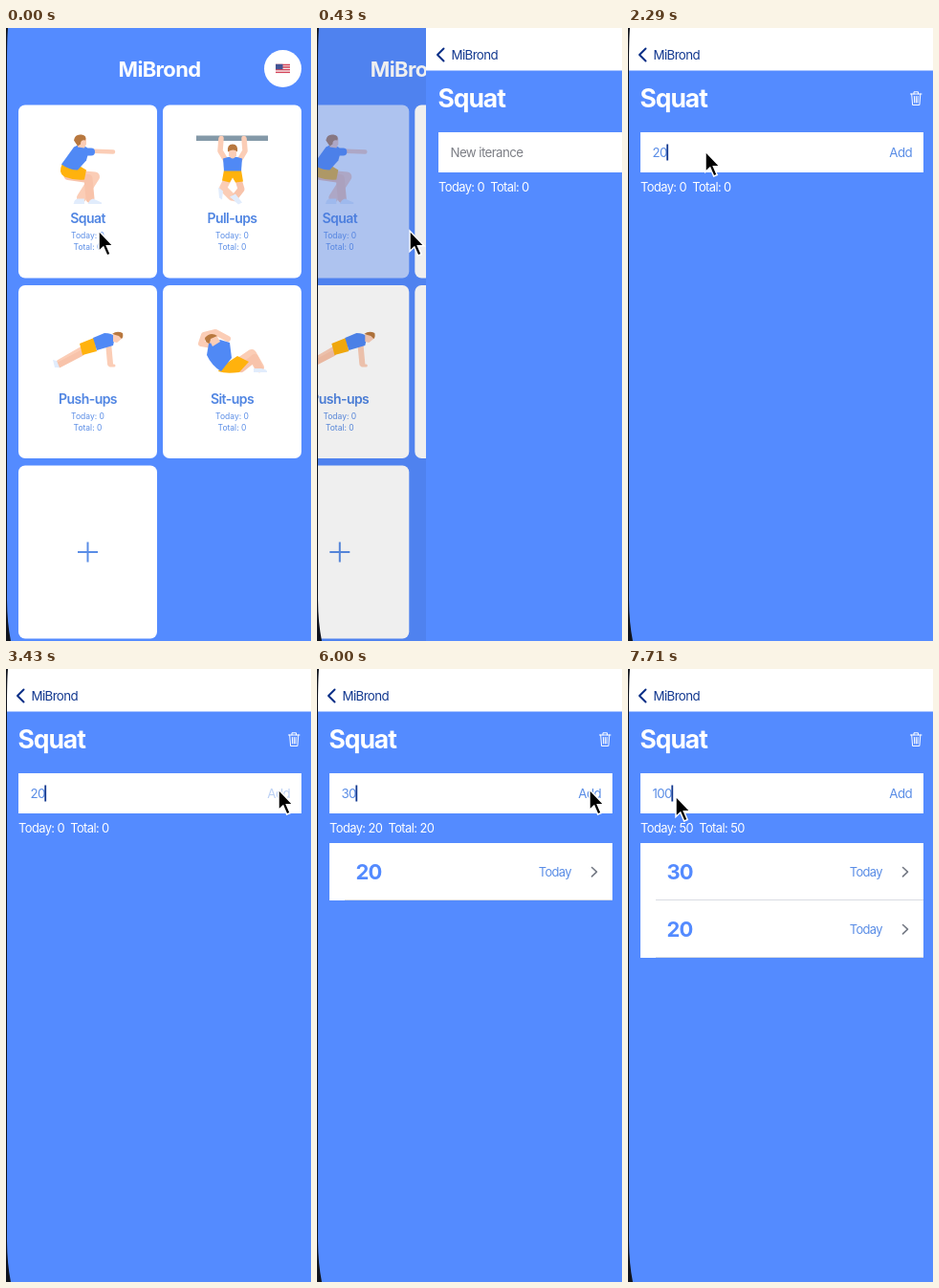
Write an HTML page that moves like this. It is 319x641 px and loops after 8 s.

```html
<!DOCTYPE html>
<html lang="en">
<head>
<meta charset="utf-8">
<title>Workout tracker</title>
<style>
html, body { margin: 0; width: 100%; height: 100%; overflow: hidden; background: #548bff; }
svg { display: block; width: 100%; height: 100%; }
text { font: 13.3px Inter, "Open Sans", sans-serif; letter-spacing: -.045em; white-space: pre; fill: #5a8de6; }
.mid { text-anchor: middle; }
.name { font-size: 14px; font-weight: 600; letter-spacing: -.04em; fill: #5085e2; }
.small { font-size: 8.5px; letter-spacing: 0; }
.logo { font-size: 22px; font-weight: 700; letter-spacing: -.03em; fill: #fff; }
.title { font-size: 26.5px; font-weight: 700; letter-spacing: -.04em; fill: #fff; }
.sum { font-size: 12.9px; fill: #fff; }
.count { font-size: 22px; font-weight: 700; letter-spacing: -.04em; fill: #548bff; }
.day { font-size: 12.9px; text-anchor: end; }
.line { fill: none; stroke-linecap: round; stroke-linejoin: round; }
</style>
</head>
<body>
<svg viewBox="0 0 319 641">
  <rect width="319" height="641" fill="#548bff"/>
  <g id="home">
    <text class="logo mid" x="160.5" y="50.5">MiBrond</text>
    <circle cx="289.5" cy="42.5" r="19.5" fill="#fff"/>
    <path d="M282 38h15v9.5h-15z" fill="#f3e4e6"/>
    <path d="M282 38.5h15M282 41h15M282 43.6h15M282 46.4h15" stroke="#d5455a" stroke-width="1.3"/>
    <path d="M282 37.8h7.5v5.4h-7.5z" fill="#435493"/>
    <g id="cards"></g>
    <path d="M85.5 537.5v21M75 548h21" stroke="#5a8de6" stroke-width="2"/>
  </g>
  <rect id="dim" width="319" height="641"/>
  <g id="page">
    <rect width="320" height="641" fill="#548bff"/>
    <rect width="320" height="44.5" fill="#fff"/>
    <path class="line" d="M18.5 21.5 12 28l6.5 6.5" stroke="#0b2f86" stroke-width="2"/>
    <text x="26.5" y="32.5" style="fill:#12388f">MiBrond</text>
    <text class="title" x="12.5" y="82.5">Squat</text>
    <path class="line" d="M295.5 69h11.5M299 69v-2.2h4.5v2.2M296.7 69l.9 11.5h7.3l.9-11.5M299.4 71.5l.3 6.5M301.3 71.5v6.5M303.2 71.5l-.3 6.5" stroke="#fff"/>
    <rect x="13" y="109" width="296" height="42" fill="#fff"/>
    <text id="field" x="25.5" y="135"></text>
    <rect id="caret" y="121.5" width="1.8" height="17" fill="#12388f"/>
    <text id="add" x="297" y="135" text-anchor="end">Add</text>
    <text id="sum" class="sum" x="13" y="171"></text>
    <g id="rows"></g>
  </g>
  <path d="M0 0H2Q1 12 1 40V598Q1.2 622 5 641H0z" fill="#10131c"/>
  <path id="mouse" d="M0 0V21.5L4.8 17 8.7 26 12.2 24.5 8.4 15.7H15z" stroke="#fff" stroke-width="1.5"/>
</svg>
<script>
const $ = id => document.getElementById(id);
const SKIN = '#fbcdb6', HAIR = '#b8783f', BLUE = '#5089f5', GOLD = '#ffb20d', SHOE = '#e1ecfc', BAR = '#8499a8';
const fill = (color, d) => `<path d="${d}" fill="${color}"/>`;
const limb = (width, d, color = SKIN) => `<path class="line" d="${d}" stroke="${color}" stroke-width="${width}"/>`;

// Figures are drawn relative to their card's corner.
const squat =
  limb(10, 'M58 73 80 75 66 97') + limb(9, 'M52 74 73 77 75 98', '#f8c3aa') +
  fill(SHOE, 'M58 103q0-4 4-5h7v5.500H57zM73 103q1-4 5-5l9 4v1.500H72z') +
  fill(GOLD, 'M46 61q-5 10 2 14 10 4 21 3l2-10-10-6z') +
  fill(BLUE, 'M45 62 58 44q6-4 13 0l3 3-3 11-9 10q-9 0-17-6z') +
  limb(4.5, 'M72 48 99 49') + limb(8, 'M66 49 76 49', BLUE) +
  fill(SKIN, 'M62 35h9v6l-2 4-7-1z') + fill(HAIR, 'M58 37q1-7 8-6 6 1 4 6-5-1-5 4l-3 2z');
const pullUps =
  fill(BAR, 'M35 32h75v5.500H35z') +
  limb(5.5, 'M61 35 60 48 66 58M85 35 86 48 80 58') +
  limb(8, 'M68 77 63 87 72 96') + limb(7, 'M79 78 82 88 75 97', '#f8c3aa') +
  fill(SHOE, 'M70 96l6-3 7 9-4 2zM58 86l5 4-1 9-3-2z') +
  fill(GOLD, 'M64 68h18l2 12-8 1-3-5-3 5-8-2z') +
  fill(BLUE, 'M63 56q10-4 20 0l-1 13H64z') +
  fill(SKIN, 'M69 46h8v7q-4 6-8 0z') + fill(HAIR, 'M68 49q-1-8 5-8t5 8q-4-4-10 0z');
const pushUps =
  limb(7, 'M43 81 69 66') + limb(6, 'M43 83 66 71', '#f8c3aa') +
  fill(SHOE, 'M36 78l4 1 3 7-5 0z') +
  limb(6, 'M94 60 96 82') + limb(3, 'M96 84h4') +
  fill(GOLD, 'M64 61 79 55 82 69 67 73z') +
  fill(BLUE, 'M78 55 90 50q8 0 11 4l-2 9-17 5z') +
  fill(SKIN, 'M99 52l8-3 1 7-5 4-4-1z') + fill(HAIR, 'M98 51q5-4 11-1 1 4-1 6l-3-3z');
const sitUps =
  limb(6, 'M52 63 40 61 43 52 55 49 68 56') +
  limb(10, 'M74 85 93 72 101 86') + limb(8, 'M82 87 96 76 101 87', '#f8c3aa') +
  fill(SHOE, 'M95 87h8q7 1 6 4H95z') +
  fill(GOLD, 'M60 86 78 74l12 6-10 11q-14 2-22-1z') +
  fill(BLUE, 'M48 61 60 57l10 3 2 16-11 14q-10-6-15-17z') +
  fill(SKIN, 'M47 54l9-2 4 7-8 5z') + fill(HAIR, 'M44 55q6-7 13-2l-7 3-1 5q-5-1-5-6z');

const card = (x, y, name, art) => `<g transform="translate(${x} ${y})">
  <rect width="145" height="181" rx="7" fill="#fff"/>${art || ''}` + (name ? `
  <text class="name mid" x="72.500" y="123.500">${name}</text>
  <text class="small mid" x="72.500" y="139.500">Today: 0</text>
  <text class="small mid" x="72.500" y="151.500">Total: 0</text>` : '') + '</g>';
$('cards').innerHTML = card(13, 80.5, 'Squat', squat) + card(164, 80.5, 'Pull-ups', pullUps) +
  card(13, 269, 'Push-ups', pushUps) + card(164, 269, 'Sit-ups', sitUps) + card(13, 457.5);

const row = (count, i) => `<g transform="translate(0 ${182 + i * 60})">
  <path d="M13 0h296v60H13z" fill="#fff"/><path d="M29 59.500h280" stroke="#d9dce3"/>
  <text class="count" x="40.500" y="38">${count}</text>
  <text class="day" x="266" y="35">Today</text>
  <path class="line" d="M287.500 25.500l5 4.700-5 4.700" stroke="#757a85" stroke-width="1.600"/></g>`;

const LOOP = 8000, RATE = 7;
const path = [[0, 97, 212], [4, 97, 212], [6, 97, 163], [8, 81, 129], [19, 81, 129], [23, 285, 126],
  [25, 285, 126], [27, 82, 127], [28, 70, 124], [37, 70, 124], [41, 281, 126], [42, 285, 126],
  [43, 285, 126], [45, 51, 135], [46, 50, 133], [56, 50, 133]];
const typed = [[0, ''], [15, '2'], [16, '20'], [25, ''], [33, '3'], [34, '30'], [44, ''], [50, '1'], [52, '10'], [54, '100']];
const caretOn = [[0, 0], [9, 1], [14, 0], [15, 1], [25, 0], [30, 1], [44, 0], [48, 1]];
const entries = [[0, []], [25, [20]], [44, [30, 20]]];
const slide = [319, 319, 258, 114, 34, 8, 0];
const fade = [1, .6, .4, .6, .8, .95, 1];

const at = (keys, n) => keys.findLast(k => k[0] <= n)[1];
function pointer(n) {
  const i = path.findIndex(k => k[0] > n), [a, x, y] = path[i - 1], [b, u, v] = path[i];
  const p = (n - a) / (b - a);
  return [x + (u - x) * p, y + (v - y) * p];
}

let shown = -1;
function draw(n) {
  const x = slide[Math.min(n, 6)], p = 1 - x / 319;
  $('home').setAttribute('transform', `translate(${-96 * p} 0)`);
  $('cards').firstElementChild.setAttribute('opacity', fade[Math.min(n, 6)]);
  $('dim').setAttribute('opacity', .1 * p);
  $('page').setAttribute('transform', `translate(${x} 0)`);

  const value = at(typed, n), list = at(entries, n), total = list.reduce((a, b) => a + b, 0);
  const field = $('field');
  field.textContent = value || 'New iterance';
  field.style.fill = value ? '#5a8de6' : '#7d7f86';
  $('caret').setAttribute('x', value ? 25 + field.getComputedTextLength() : 25.5);
  $('caret').setAttribute('opacity', at(caretOn, n));
  $('add').setAttribute('opacity', n === 24 || n === 43 ? .4 : 1);
  $('sum').textContent = `Today: ${total}  Total: ${total}`;
  $('rows').innerHTML = list.map(row).join('');
  $('mouse').setAttribute('transform', `translate(${pointer(n)})`);
}
function tick() {
  const n = Math.floor((performance.now() % LOOP + 5) * RATE / 1000) % (LOOP * RATE / 1000);
  if (n !== shown) draw(shown = n);
  requestAnimationFrame(tick);
}
tick();
</script>
</body>
</html>
```
